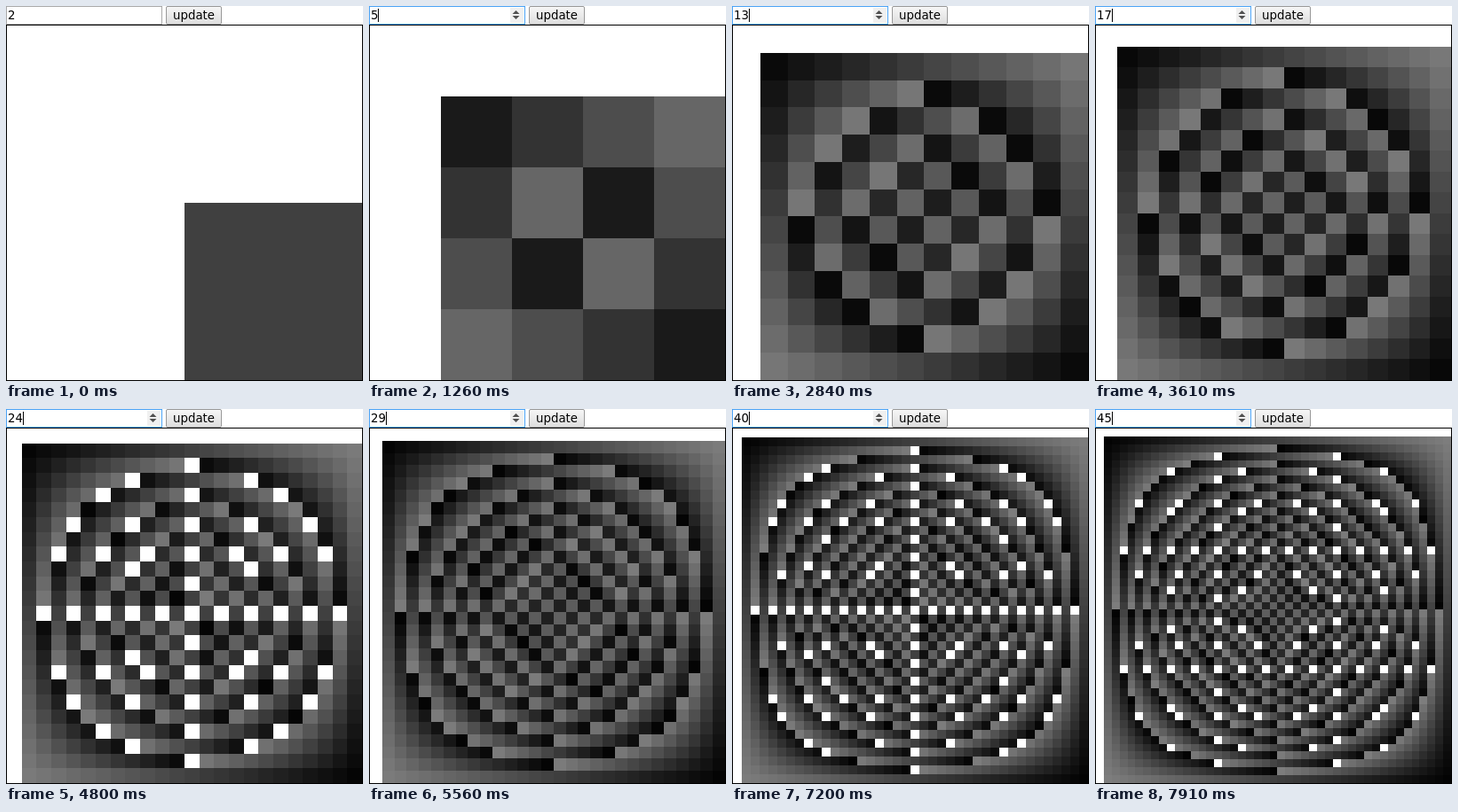
Recreate the animation shown at these times as an HTML page with a canvas. Size 402x423 px, loop 8 s.

```html
<!DOCTYPE html>
<html lang="en">
<head>
<meta charset="utf-8">
<title>Multiplication table modulo n</title>
<style>
  html, body { margin: 0; width: 100%; height: 100%; overflow: hidden; background: #fff; }
  body { position: relative; font: 13.333px/19px "DejaVu Sans", sans-serif; color: #000; }
  body > * { position: absolute; box-sizing: border-box; }
  #field { left: 0; top: 0; width: 176px; height: 21px; padding-left: 1px; border: 1px solid #a9a9a9; }
  #field.focus { border-color: #4ba3f5; }
  #caret { position: absolute; top: 2px; width: 1px; height: 15px; background: #000; }
  #spin { position: absolute; right: 1px; top: 1px; width: 15px; height: 17px; background: #f0f0f0; fill: #505050; }
  #field:not(.focus) > :not(#value) { display: none; }
  #update { left: 180px; top: 0; width: 63px; height: 21px; text-align: center;
    border: 1px solid #999; border-radius: 2px; background: linear-gradient(#f6f6f6, #dedede); }
  #table { left: 0; top: 21px; width: 402px; height: 402px; border: 1px solid #000; }
</style>
</head>
<body>
<div id="field"><span id="value">2</span><i id="caret"></i>
  <svg id="spin" viewBox="0 0 15 17"><path d="M2.5 7 6.5 3 10.5 7zM2.5 9 6.5 13 10.5 9z"/></svg>
</div>
<div id="update">update</div>
<canvas id="table" width="400" height="400"></canvas>
<script>
const LOOP = 8000, SIZE = 400, FOCUS_AT = 210;

// Pace of the counter: [value, time in ms], steady in between
const PACE = [[2, 0], [3, 770], [5, 1260], [17, 3610], [24, 4800], [35, 6420], [45, 7910]];

const $ = id => document.getElementById(id);
const field = $('field'), value = $('value'), caret = $('caret');
const ctx = $('table').getContext('2d');
let shown = 0;

function valueAt(t) {
  const i = PACE.findIndex(([, time]) => time > t);
  if (i < 0) return PACE[PACE.length - 1][0];
  const [from, start] = PACE[i - 1], [to, end] = PACE[i];
  return from + Math.floor((t - start) / (end - start) * (to - from));
}

function drawTable(n) {
  const edge = k => Math.round(k * SIZE / n);
  ctx.fillStyle = '#fff';
  ctx.fillRect(0, 0, SIZE, SIZE);
  for (let row = 1; row < n; row++) {
    for (let col = 1; col < n; col++) {
      const rest = row * col % n;
      if (!rest) continue;
      const g = Math.round(127.5 * rest / n);
      const x = edge(col), y = edge(row);
      ctx.fillStyle = `rgb(${g},${g},${g})`;
      ctx.fillRect(x, y, edge(col + 1) - x, edge(row + 1) - y);
    }
  }
}

function render(t) {
  field.classList.toggle('focus', t >= FOCUS_AT);
  const n = valueAt(t);
  if (n === shown) return;
  shown = n;
  value.textContent = n;
  caret.style.left = (n < 10 ? 9 : 18) + 'px';
  drawTable(n);
}

const began = performance.now();
function tick() {
  render((performance.now() - began) % LOOP);
  requestAnimationFrame(tick);
}
tick();
</script>
</body>
</html>
```
